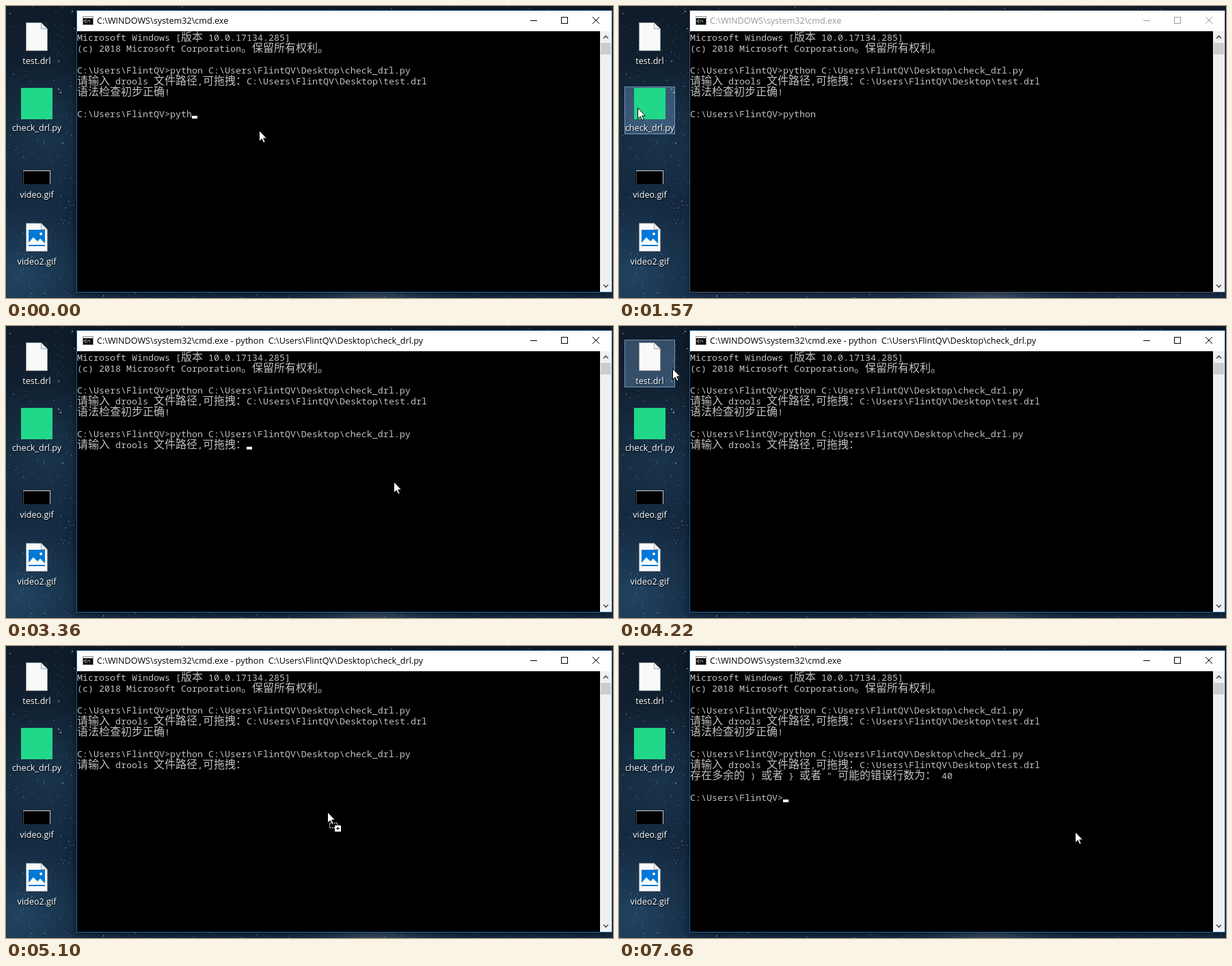
An HTML page with a canvas that plays this animation: 888x428 px, repeating every 8000 ms.

```html
<!DOCTYPE html>
<html lang="zh">
<head>
<meta charset="utf-8">
<title>check_drl</title>
<style>
html, body { margin: 0; width: 100%; height: 100%; overflow: hidden; background: #10203a; }
canvas { display: block; }
</style>
</head>
<body>
<canvas id="stage" width="888" height="428"></canvas>
<script>
const W = 888, H = 428, LOOP = 8000;
const ctx = document.getElementById('stage').getContext('2d');

const HOME = 'C:\\Users\\FlintQV';
const PROMPT = HOME + '>';
const SCRIPT = HOME + '\\Desktop\\check_drl.py';
const RULES = HOME + '\\Desktop\\test.drl';
const ASK = '请输入 drools 文件路径,可拖拽：';
const SHELL = 'C:\\WINDOWS\\system32\\cmd.exe';
const BUSY = SHELL + ' - python  ' + SCRIPT;
const HISTORY = [
  'Microsoft Windows [版本 10.0.17134.285]',
  '(c) 2018 Microsoft Corporation。保留所有权利。',
  '',
  PROMPT + 'python ' + SCRIPT,
  ASK + RULES,
  '语法检查初步正确!',
  ''
];
const RUN = PROMPT + 'python ' + SCRIPT;
const UI_FONT = '12.6px "Open Sans", "Noto Sans", sans-serif';

const START = {
  lines: [PROMPT + 'pyth'], caret: true, mouse: [370, 182],
  drag: '', hover: '', active: true, title: SHELL
};
// Each step changes only the listed parts of the state.
const STEPS = [
  [120, { lines: [PROMPT + 'pytho'] }],
  [240, { lines: [PROMPT + 'python'] }],
  [360, { lines: [PROMPT + 'python '], caret: false }],
  [640, { caret: true }],
  [910, { mouse: [300, 172] }],
  [1030, { mouse: [187, 152], caret: false }],
  [1180, { mouse: [76, 150], hover: 'check' }],
  [1300, { mouse: [29, 150] }],
  [1450, { active: false }],
  [1570, { mouse: [27, 149] }],
  [1720, { mouse: [140, 165], hover: '', drag: 'check' }],
  [1850, { mouse: [440, 200], active: true, drag: 'copy' }],
  [2000, { mouse: [520, 216] }],
  [2120, { mouse: [567, 228], drag: '', lines: [RUN], caret: true }],
  [2800, { caret: false }],
  [3360, { lines: [RUN, ASK], caret: true, title: BUSY }],
  [3950, { mouse: [360, 165], caret: false }],
  [4070, { mouse: [161, 107] }],
  [4220, { mouse: [78, 62], hover: 'test' }],
  [4340, { mouse: [50, 42], caret: true }],
  [4500, { mouse: [46, 39] }],
  [4800, { active: false, caret: false }],
  [4950, { mouse: [95, 91], hover: '', drag: 'test' }],
  [5100, { mouse: [470, 243], active: true, drag: 'copy' }],
  [5220, { mouse: [500, 247] }],
  [5370, { mouse: [516, 250], drag: '', lines: [RUN, ASK + RULES], caret: true }],
  [5520, { mouse: [667, 272], caret: false }],
  [6110, { caret: true }],
  [6390, {
    lines: [RUN, ASK + RULES, '存在多余的 ) 或者 } 或者 " 可能的错误行数为： 40', '', PROMPT],
    title: SHELL
  }],
  [7100, { caret: false }],
  [7660, { caret: true }]
];

function stateAt(time) {
  const state = { ...START };
  for (const [at, change] of STEPS) if (time >= at) Object.assign(state, change);
  return state;
}

function rect(x, y, w, h, color) {
  ctx.fillStyle = color;
  ctx.fillRect(x, y, w, h);
}

function frame(x, y, w, h, color) {
  ctx.strokeStyle = color;
  ctx.lineWidth = 1;
  ctx.strokeRect(x + 0.5, y + 0.5, w - 1, h - 1);
}

function trace(points, close) {
  ctx.beginPath();
  points.forEach(([x, y]) => ctx.lineTo(x, y));
  if (close) ctx.closePath();
}

function shape(points, fill, stroke) {
  trace(points, true);
  ctx.fillStyle = fill;
  ctx.fill();
  if (!stroke) return;
  ctx.strokeStyle = stroke;
  ctx.lineWidth = 1;
  ctx.stroke();
}

function line(points, color, width = 1) {
  trace(points, false);
  ctx.strokeStyle = color;
  ctx.lineWidth = width;
  ctx.stroke();
}

function makeWallpaper() {
  const layer = document.createElement('canvas');
  layer.width = W;
  layer.height = H;
  const c = layer.getContext('2d');
  const glow = (x, y, r, color) => {
    const g = c.createRadialGradient(x, y, 0, x, y, r);
    g.addColorStop(0, color);
    g.addColorStop(1, 'rgba(40,80,110,0)');
    c.fillStyle = g;
    c.fillRect(0, 0, W, H);
  };
  const sky = c.createLinearGradient(0, 0, 0, H);
  sky.addColorStop(0, '#0f1b29');
  sky.addColorStop(0.45, '#12263a');
  sky.addColorStop(1, '#152b44');
  c.fillStyle = sky;
  c.fillRect(0, 0, W, H);
  glow(20, 395, 120, 'rgba(46,92,128,.5)');
  glow(60, 190, 110, 'rgba(36,74,106,.35)');
  glow(540, 440, 130, 'rgba(110,125,142,.5)');

  let seed = 71;
  const random = () => (seed = seed * 16807 % 2147483647) / 2147483647;
  const star = (x, y) => {
    c.fillStyle = `rgba(165,200,225,${0.1 + 0.6 * random() ** 3})`;
    const size = random() > 0.9 ? 2 : 1;
    c.fillRect(Math.floor(x), Math.floor(y), size, size);
  };
  for (let i = 0; i < 480; i++) star(random() * 104, random() * H);
  for (let i = 0; i < 120; i++) star(random() * W, 420 + random() * 8);
  for (let i = 0; i < 60; i++) star(random() * W, random() * 6);
  return layer;
}
const wallpaper = makeWallpaper();

function page(x, y) {
  shape([[x + .5, y + .5], [x + 22.5, y + .5], [x + 31.5, y + 9.5],
    [x + 31.5, y + 41.5], [x + .5, y + 41.5]], '#f9f9f9', '#8d9298');
  shape([[x + 22.5, y + .5], [x + 31.5, y + 9.5], [x + 22.5, y + 9.5]], '#eceeef', '#a4a8ac');
}

function label(text, y) {
  ctx.save();
  ctx.font = UI_FONT;
  ctx.textAlign = 'center';
  ctx.shadowColor = '#000';
  ctx.shadowBlur = 2;
  ctx.shadowOffsetX = ctx.shadowOffsetY = 1;
  ctx.fillStyle = '#fff';
  ctx.fillText(text, 45, y);
  ctx.restore();
}

const icons = {
  test() {
    page(29, 24);
    label('test.drl', 85);
  },
  check() {
    rect(22, 120, 46, 46, '#21d789');
    label('check_drl.py', 183);
  },
  video() {
    rect(23, 240, 42, 22, '#000');
    frame(23, 240, 42, 22, '#1d2a37');
    rect(25, 241, 39, 1, '#d5dbe1');
    rect(25, 242, 1, 19, '#4c5a68');
    rect(64, 241, 1, 20, '#c5c9cd');
    label('video.gif', 281);
  },
  picture() {
    page(29, 318);
    rect(33, 328, 24, 24, '#0078d7');
    shape([[33, 347], [40, 339], [46, 345], [50, 341], [57, 348], [57, 350], [33, 350]], '#fff');
    ctx.beginPath();
    ctx.arc(51, 334, 2, 0, 7);
    ctx.fillStyle = '#fff';
    ctx.fill();
    label('video2.gif', 379);
  }
};

function highlight(y) {
  rect(8, y, 74, 70, 'rgba(130,180,230,.32)');
  frame(8, y, 74, 70, 'rgba(160,200,240,.55)');
}

// Half-width characters take one 8px cell, full-width characters two.
function consoleLine(text, row) {
  const base = 37 + row * 16 + 14;
  let x = 104;
  ctx.fillStyle = '#c0c0c0';
  for (const run of text.match(/[\x20-\x7e]+|[^\x20-\x7e]+/g) || []) {
    const half = run.charCodeAt(0) < 127;
    ctx.font = half
      ? '13.333px "Noto Sans Mono", monospace'
      : '16px "Noto Sans CJK SC", "Noto Sans CJK", sans-serif';
    ctx.fillText(run, x, base);
    x += run.length * (half ? 8 : 16);
  }
  return x;
}

function windowFrame(active, title) {
  const ink = active ? '#000' : '#999';
  ctx.save();
  ctx.shadowColor = `rgba(0,0,0,${active ? 0.55 : 0.3})`;
  ctx.shadowBlur = active ? 12 : 6;
  ctx.shadowOffsetY = 2;
  rect(103, 6, 784, 414, active ? '#17629f' : '#4a5664');
  ctx.restore();
  rect(104, 7, 782, 30, '#fff');
  rect(104, 37, 765, 382, '#000');

  rect(112, 15, 16, 13, '#8f969c');
  rect(113, 16, 14, 2, '#e4e8eb');
  rect(113, 18, 14, 9, '#000');
  rect(115, 20, 3, 1, '#ddd');
  rect(114, 21, 1, 2, '#ddd');
  rect(115, 23, 3, 1, '#ddd');
  rect(119, 21, 1, 1, '#ddd');
  rect(119, 23, 1, 1, '#ddd');
  line([[121, 20], [123, 24]], '#ddd');

  ctx.font = UI_FONT;
  ctx.fillStyle = ink;
  ctx.fillText(title, 133, 26);
  rect(767, 21, 10, 1, ink);
  frame(812, 16, 10, 10, ink);
  line([[858, 16], [868, 26]], ink);
  line([[868, 16], [858, 26]], ink);

  rect(869, 37, 17, 382, '#f0f0f0');
  rect(870, 54, 15, 17, '#cdcdcd');
  line([[874, 47.5], [877.5, 44], [881, 47.5]], '#505050', 1.6);
  line([[874, 408.5], [877.5, 412], [881, 408.5]], '#505050', 1.6);
}

function pointer([x, y], copying) {
  ctx.save();
  ctx.translate(x, y);
  if (copying) {
    ctx.setLineDash([2, 1]);
    frame(3, 16, 12, 8, '#fff');
    ctx.setLineDash([]);
    rect(11, 20, 9, 9, '#fff');
    rect(13, 24, 5, 1, '#000');
    rect(15, 22, 1, 5, '#000');
  }
  shape([[.5, .5], [.5, 16.5], [4.2, 13], [6.8, 18.5], [9.2, 17.5],
    [6.7, 12], [11.5, 12]], '#fff', '#000');
  ctx.restore();
}

// A dragged icon keeps its offset from the point where it was grabbed.
function ghost(name, [x, y]) {
  const [gx, gy] = name === 'test' ? [46, 39] : [27, 149];
  ctx.save();
  ctx.globalAlpha = 0.5;
  ctx.translate(x - gx, y - gy);
  icons[name]();
  ctx.restore();
}

function draw(time) {
  const s = stateAt(time);
  ctx.drawImage(wallpaper, 0, 0);
  if (s.hover) highlight(s.hover === 'test' ? 20 : 118);
  Object.values(icons).forEach(paint => paint());
  windowFrame(s.active, s.title);

  const lines = HISTORY.concat(s.lines);
  let end = 104;
  lines.forEach((text, row) => { end = consoleLine(text, row); });
  if (s.caret) rect(end, 37 + lines.length * 16 - 4, 8, 4, '#fff');

  if (icons[s.drag]) ghost(s.drag, s.mouse);
  pointer(s.mouse, s.drag === 'copy');
}

const began = performance.now();
function tick() {
  draw((performance.now() - began) % LOOP);
  requestAnimationFrame(tick);
}
tick();
</script>
</body>
</html>
```
